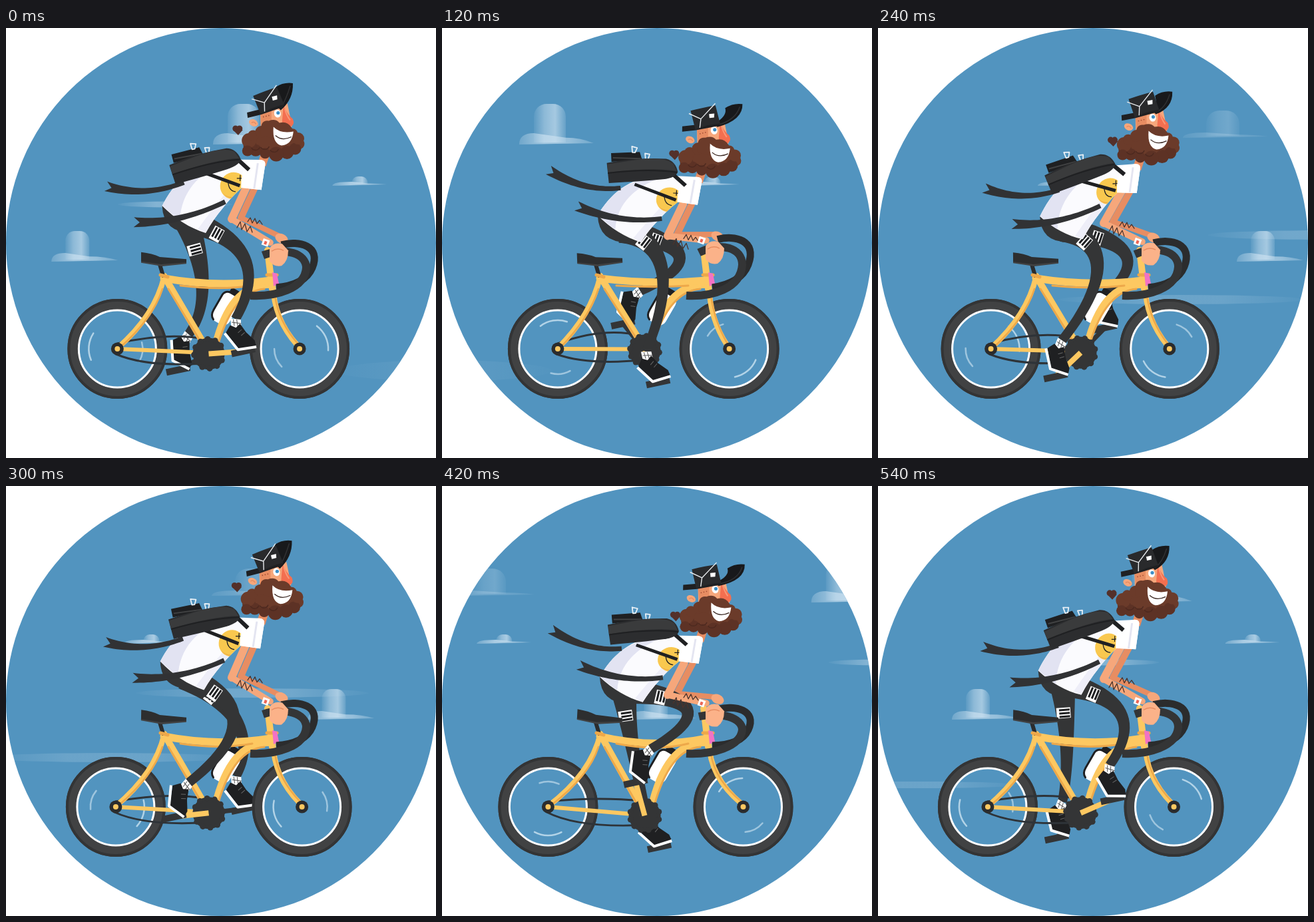
These frames come from a looping animation (646x646 px, 570 ms). An HTML page with a canvas:

```html
<!DOCTYPE html>
<html lang="en">
<head>
<meta charset="utf-8">
<title>Cyclist</title>
<style>
html, body { margin: 0; width: 100%; height: 100%; overflow: hidden; background: #fff; }
canvas { display: block; width: 646px; height: 646px; }
</style>
</head>
<body>
<canvas id="stage" width="646" height="646"></canvas>
<script>
const ctx = document.getElementById('stage').getContext('2d');
const STEP = 30, STEPS = 19, RAD = Math.PI / 180;
const SKY = '#5294bf', DARK = '#343536', BLACK = '#1f2022', GREY = '#414243';
const YELLOW = '#fdc861', AMBER = '#eda84a', SKIN = '#f6a77b', SHADE = '#e78d62';
const BROWN = '#6b3b2a', UMBER = '#5d3225';

const wave = (deg, mean, amp, peak) => mean + amp * Math.cos((deg - peak) * RAD);
const add = (p, x, y) => [p[0] + x, p[1] + y];
const mix = (p, q, u = .5) => [p[0] + (q[0] - p[0]) * u, p[1] + (q[1] - p[1]) * u];
const polar = (p, r, deg) => add(p, r * Math.cos(deg * RAD), r * Math.sin(deg * RAD));

function fill(d, color) {
  ctx.fillStyle = color;
  ctx.fill(new Path2D(d));
}
function line(d, color, w) {
  ctx.strokeStyle = color;
  ctx.lineWidth = w;
  ctx.stroke(new Path2D(d));
}
function dot(x, y, r, color, ry = r, tilt = 0) {
  ctx.fillStyle = color;
  ctx.beginPath();
  ctx.ellipse(x, y, r, ry, tilt * RAD, 0, 7);
  ctx.fill();
}
function arc(x, y, r, from, to, color, w) {
  ctx.strokeStyle = color;
  ctx.lineWidth = w;
  ctx.beginPath();
  ctx.arc(x, y, r, from * RAD, to * RAD);
  ctx.stroke();
}
function group(p, deg, draw) {
  ctx.save();
  ctx.translate(p[0], p[1]);
  ctx.rotate(deg * RAD);
  draw();
  ctx.restore();
}

// Quadratic curve through `m` at its middle.
function bend(a, m, b) {
  const c = [0, 1].map(i => 2 * m[i] - (a[i] + b[i]) / 2);
  return u => {
    const p = mix(a, c, u), q = mix(c, b, u);
    return [...mix(p, q, u), Math.atan2(q[1] - p[1], q[0] - p[0])];
  };
}
function taper(curve, width, color, notch = 0) {
  const left = [], right = [];
  for (let i = 0; i <= 24; i++) {
    const [x, y, t] = curve(i / 24), h = width(i / 24) / 2;
    left.push([x - h * Math.sin(t), y + h * Math.cos(t)]);
    right.unshift([x + h * Math.sin(t), y - h * Math.cos(t)]);
  }
  const [x, y, t] = curve(1);
  if (notch) left.push([x - notch * Math.cos(t), y - notch * Math.sin(t)]);
  fill('M' + [...left, ...right].join('L') + 'Z', color);
}

// Things that blow past leftwards: at `x` on step `k0`, repeating every loop.
function passes(k, k0, x, speed, draw) {
  const dk = (k - k0 + 1.5 * STEPS) % STEPS - STEPS / 2;
  for (const lap of [-STEPS, 0, STEPS]) draw(x - speed * (dk + lap));
}
function fade(x0, x1, ...stops) {
  const g = ctx.createLinearGradient(x0, 0, x1, 0);
  stops.forEach((a, i) => g.addColorStop(i / (stops.length - 1), `rgba(205,226,241,${a})`));
  return g;
}
function cloud(x, y, tw, th, l, r, bh, a) {
  ctx.fillStyle = fade(x - tw, x + tw, .1 * a, .6 * a, .85 * a, .2 * a);
  ctx.beginPath();
  ctx.roundRect(x - tw, y - th, 2 * tw, th - 3, [tw * .8, tw * .8, 0, 0]);
  ctx.fill();
  const base = `M${x - l},${y}Q${x - l},${y - bh} ${x - tw},${y - bh}L${x + tw},${y - bh * .6}Q${x + r * .7},${y - bh * .6} ${x + r},${y - 2}Z`;
  fill(base, fade(x - l, x + r, .3 * a, .85 * a, .7 * a, .3 * a));
}
function streak(x, y, w, h, a) {
  dot(x, y, w / 2, fade(x - w / 2, x + w / 2, .1 * a, a, a, .1 * a), h / 2);
}
function sky(k) {
  passes(k, 0, 357, 48.75, x => cloud(x, 175, 24, 61, 46, 66, 17, .8));
  passes(k, 8, 518, 74.5, x => cloud(x, 165, 25, 41, 60, 68, 8, .3));
  passes(k, 13, 364, 42.8, x => cloud(x, 351, 18, 46, 39, 61, 13, .8));
  passes(k, 8, 281, 31.3, x => cloud(x, 237, 12, 14, 41, 41, 6, .85));
  passes(k, 0, 254, 82.5, x => streak(x, 265, 172, 9, .4));
  passes(k, 8, 455, 150, x => streak(x, 408, 370, 14, .2));
  passes(k, 12, 70, 150, x => streak(x, 311, 350, 14, .25));
  passes(k, 16, 520, 230, x => streak(x, 449, 300, 10, .2));
  passes(k, 2, 330, 200, x => streak(x, 515, 470, 36, .1));
}

function wheel(x, turn) {
  const y = 482;
  arc(x, y, 67, 0, 360, GREY, 16);
  arc(x, y, 73, 0, 360, '#333435', 4);
  arc(x, y, 58, 0, 360, '#fff', 3);
  ctx.lineCap = 'round';
  arc(x, y, 43, turn - 28, turn + 28, 'rgba(220,238,248,.7)', 2.5);
  arc(x, y, 38, turn + 160, turn + 205, 'rgba(220,238,248,.55)', 2.5);
}
function hub(x) {
  dot(x, 482, 9.5, '#2b2c2d');
  dot(x, 482, 4, YELLOW);
}

// One leg with its crank, at its own phase of the pedal stroke.
function stroke(deg, bb, knee, reach) {
  const crank = deg - 4 - 6 * (1 - Math.cos(deg * RAD));
  const pedal = polar(bb, 52, crank);
  const foot = add(pedal, -8, wave(deg, -9, 9, 45));
  const tilt = wave(deg, 12, -32, 50);
  return {
    bb, pedal, foot, tilt, crank,
    knee: [wave(deg, knee[0], reach[0], 295), wave(deg, knee[1], reach[1], 107)]
  };
}
function crankArm({ bb, pedal }, color, w) {
  line(`M${bb}L${pedal}`, color, w);
  group(pedal, -12, () => fill('M-18,-5H18V5H-18Z', DARK));
}
function leg(hip, { knee, foot, tilt }) {
  const curve = bend(hip, knee, polar(foot, 46, tilt - 86));
  taper(curve, u => 14 + 20 * (1 - u) ** 3 + 5 * (1 - u), DARK);
  const [x, y, t] = curve(.2);
  group([x, y], t / RAD, () => {
    fill('M-8,-8H8V13H-8Z', '#fff');
    for (const dx of [-5, 0, 5]) fill(`M${dx - 1},-7h3V9h-3Z`, BLACK);
  });
  group(foot, tilt, () => {
    fill('M-4,-48L11,-44L10,-30L-5,-33Z', '#fff');
    line('M-3,-42L11,-38M0,-46V-36M5,-45V-34', '#555', 1);
    fill('M-14,-28L-6,-38L2,-33L9,-38L16,-24L27,-10L28,-1H1Z', BLACK);
    line('M-16,-27L0,0H28', '#fff', 4);
    line('M10,-29L4,-25M14,-24L8,-20', '#666', 1);
  });
}

function bike(rx, fx, bb, dy, crank, turn) {
  const sag = dy * .5;
  wheel(rx, turn);
  wheel(fx, turn + 150);
  group([330, 422], 30, () => {
    ctx.beginPath();
    ctx.roundRect(-15, -25, 30, 49, 10);
    ctx.fillStyle = '#fff';
    ctx.fill();
    line('M-8,23Q-15,20 -15,10V-16Q-14,-24 -6,-25H8', BLACK, 3);
    fill('M-8,-33H8V-25H-8Z', BLACK);
    line('M9,-18V16', '#d6dbe6', 3);
  });
  line(`M${rx},474Q${(rx + bb[0]) / 2 + 5},${456 + dy} ${bb[0] - 5},${bb[1] - 22}M${rx - 2},490Q${rx + 45},${510 + dy * .4} ${bb[0]},${bb[1] + 14}`, '#2e3338', 3);
  line(`M${rx},482L${bb[0] - 15},${bb[1] - 2}`, YELLOW, 6);
  line(`M238,372Q224,432 ${rx},481`, YELLOW, 8);
  line(`M235,392Q221,436 ${rx + 4},480`, AMBER, 2.5);
  line(`M401,385Q402,437 ${fx - 3},477`, YELLOW, 8);
  line(`M404,402Q409,440 ${fx - 3},474`, AMBER, 2.5);
  line(`M394,386Q336,385 ${bb[0] + 9},${bb[1] - 10}`, YELLOW, 10);
  line(`M388,392Q342,396 ${bb[0] + 14},${bb[1] - 14}`, AMBER, 3);
  line(`M240,377L${bb[0] - 3},${bb[1] - 8}`, YELLOW, 10);
  line(`M244,392L${bb[0] - 9},${bb[1] - 13}`, AMBER, 3);
  line(`M237,376Q318,${390 + sag} 398,379`, YELLOW, 11);
  line(`M262,387Q322,${394 + sag} 370,387`, AMBER, 3);
  line('M230,352L236,372', '#2b2c2d', 6);
  line('M232,371L243,374', AMBER, 5);
  group([237, 347], dy * .3, () => {
    fill('M-34,-10Q-17,-8 -6,-3L34,0V6L-4,9L-34,5Z', '#2d2e2f');
    fill('M-34,4L-4,8L34,5V7L-2,11L-34,6Z', GREY);
  });
  line('M393,334L400,392', YELLOW, 10);
  line('M392,371H407', AMBER, 5);
  fill('M400,367L407,369L410,384L402,388Z', '#f272c4');
  hub(rx);
  hub(fx);
  dot(...bb, 24, DARK);
  for (let i = 0; i < 12; i++) dot(...polar(bb, 22, i * 30 + crank), 4.5, DARK);
}
function bars(dy) {
  line(`M414,${325 + dy}C440,${318 + dy} 474,${326 + dy} 460,${360 + dy * .6}Q449,${386 + dy * .3} 406,390`, '#2b2c2d', 11);
  line(`M386,${341 + dy * .5}C420,${328 + dy} 451,${338 + dy} 451,${360 + dy * .6}C449,392 405,404 367,402`, DARK, 12);
}

// Draws torso artwork from its rest pose onto the moving hem and neck.
function onTorso(back, front, neck, draw) {
  const [mx, my] = [0, 1].map(i => {
    const u = front[i] - back[i], v = neck[i] - back[i];
    const x = (65 * u + 40 * v) / 10260, y = (146 * u - 68 * v) / 10260;
    return [x, y, back[i] - x * 234 - y * 268];
  });
  ctx.save();
  ctx.transform(mx[0], my[0], mx[1], my[1], mx[2], my[2]);
  draw();
  ctx.restore();
}
function shirt() {
  const outline = 'M234,268C250,235 275,203 330,198L380,198Q390,198 388,208L384,243L354,240Q338,255 327,270Q312,288 302,308C278,301 255,288 234,268Z';
  fill(outline, '#fbfbfe');
  ctx.save();
  ctx.clip(new Path2D(outline));
  fill('M234,268C250,235 275,205 320,205C290,220 262,245 262,290Z', '#e2e3f2');
  fill('M302,308Q325,270 350,240L338,238Q312,270 290,302Z', '#eeeef8');
  dot(341, 237, 20, '#f9c84f');
  fill('M325,248A20,20 0 0 0 352,252Q336,258 325,248Z', AMBER);
  ctx.restore();
  line('M351,221V230M346,226H355M333,231Q334,245 345,246', BLACK, 1.3);
  fill('M353,240Q351,218 362,200L380,198Q390,198 388,208L384,243Z', '#fff');
  line('M377,203L373,241', '#e4e5f1', 3);
  line('M287,215L351,237', BLACK, 5);
  line('M336,189L364,213', BLACK, 6);
}
function bag() {
  fill('M-47,-25L-4,-28L0,-16L-46,-12Z', BLACK);
  line('M-44,-18H-2', GREY, 2);
  line('M-15,-27L-16,-36L-8,-34L-11,-27ZM5,-18L4,-26L11,-25L9,-18', '#e8f0f6', 1.8);
  fill('M-53,-10Q-10,-20 36,-19Q50,-16 54,0Q52,9 32,12Q0,16 -49,20Z', '#2c2d2f');
  fill('M-20,-14Q30,-24 47,-12L52,-1Q20,-6 -51,4L-52,-8Z', '#3a3b3c');
  line('M-51,5Q10,-4 53,1', BLACK, 2);
}
function ribbon(from, tail, drop) {
  taper(bend(from, add(mix(from, tail), 0, drop), tail), u => 7 + 8 * u * u, '#313234', 9);
}

function head() {
  fill('M-21,-44L20,-52L27,-18L12,-4L-20,-8Z', SKIN);
  fill('M-21,-44L-4,-46L-4,-26L-19,-16Z', SHADE);
  dot(-31, -23, 7, SKIN, 5, 25);
  line('M-34,-23Q-30,-26 -27,-21', SHADE, 1.5);
  for (const x of [-16, -12, -8]) dot(x, -31 + x % 5, .9, '#a34e35');
  dot(5, -37, 5, '#fff', 6, -15);
  dot(6, -38, 2.6, '#3d8fc6');
  line('M-2,-44Q4,-48 11,-45', '#3b241d', 2);
  fill('M14,-49Q20,-35 28,-29Q32,-20 24,-17Q13,-17 12,-25Z', '#f36f50');
  line('M16,-45Q18,-35 24,-27', '#fa9775', 2);
  dot(0, 6, 39, BROWN, 19);
  for (let i = 0; i < 14; i++) {
    const [x, y] = polar([0, 0], 1, i * 360 / 14 + 8);
    dot(38 * x, 18 * y + 6, 8 + i * 5 % 4, y > .2 ? UMBER : BROWN);
  }
  dot(-40, 19, 8, UMBER);
  fill('M-20,-12Q-20,-28 -8,-26Q2,-30 8,-23Q20,-26 26,-16Q32,-10 26,-4L-4,0L-20,-4Z', BROWN);
  for (const x of [-28, -14, 0]) arc(x, 14 + x % 5, 7, 20, 150, '#4d291f', 1.5);
  fill('M-1,-17Q10,-6 29,-10Q27,10 11,11Q-3,8 -1,-17Z', '#fff');
  line('M2,-4Q12,5 26,-2', '#3a2721', 1.3);
}
function tuft() {
  for (const x of [-3, 3]) dot(x, -2, 4.5, '#54302a');
  fill('M-7,0L1,8L8,0Z', '#54302a');
}
function cap(tip, tilt) {
  const [x, y] = tip;
  fill(`M13,9Q${x - 22},${y + 18} ${x - 26},${y + 6}Q${x - 14},${y - 2} ${x},${y}Q${x + 1},${y + 24} 18,14Z`, '#18191b');
  line(`M18,11Q${x - 10},${y + 24} ${x - 4},${y + 4}`, '#303133', 1.5);
  group([0, 0], tilt, () => {
    fill('M-36,9L-18,9L21,8L20,14L-16,17L-37,17Z', BLACK);
    fill('M-21,-13Q0,-16 17,-17L21,11Q2,10 -17,16Z', '#292a2c');
    line('M-24,-9L-7,1L17,-20M-7,1L-10,14', '#e6e9ec', 1.4);
    fill('M6,-5L14,-5L13,1L6,1Z', '#fff');
  });
}
function arm(shoulder, elbow, hand, color, w) {
  line(`M${shoulder}L${elbow}`, color, w);
  line(`M${elbow}L${hand}`, color, w * .8);
}

function draw(k) {
  // The wheels and pedals cycle once per loop, the body bobs twice.
  const turn = 360 * k / STEPS;
  const bob = (mean, amp, peak) => wave(2 * turn, mean, amp, peak);

  const dy = wave(turn, 1.5, -9, 85);
  const bb = [304.5, 489 + dy * .6];
  const near = stroke(turn, bb, [348, 350], [23, 15]);
  const far = stroke(turn + 168, bb, [325, 370], [50, 38]);

  const back = [bob(236.5, 9.5, 258), bob(278, 17, 230)];
  const front = [bob(301.5, 8.5, 260), bob(317, 11, 215)];
  const neck = [bob(383, 5, 250), bob(216.5, 13.5, 180)];
  const tail = [bob(157, 10, 225), bob(227, 14, 320)];
  const bagAt = [neck[0] - 82, bob(213, 12, 235)];
  const headAt = add(neck, 21.5, -37.5);
  const brim = [bob(47, 11, 190), bob(-22, 7, 230)];
  const hip = add(mix(back, front), 4, 2);
  const elbow = [339, neck[1] + 84];
  const lift = dy * .4;

  ctx.clearRect(0, 0, 646, 646);
  ctx.save();
  ctx.lineJoin = 'round';
  ctx.lineCap = 'butt';
  dot(323, 323, 323, SKY);
  ctx.clip();
  sky(k);

  crankArm(far, DARK, 7);
  leg(hip, far);
  bike(wave(turn, 166.7, 7.3, 85), wave(turn, 442, -10.5, 85), bb, dy, near.crank, turn + 185);

  ctx.lineCap = 'round';
  arm(add(neck, -7, 36), [353, elbow[1] - 2], [412, 313 + lift], SHADE, 10);
  dot(414, 316 + lift, 10, SKIN, 7, 25);

  fill(`M${back}Q${add(back, 2, 44)} ${add(mix(back, front), 20, 20)}L${front}Z`, DARK);
  ctx.lineCap = 'butt';
  crankArm(near, YELLOW, 8);
  leg(hip, near);

  line(`M${add(neck, 3, 3)}L${add(neck, 9, -16)}`, SHADE, 13);
  ctx.lineCap = 'round';
  arm(add(neck, -20, 36), elbow, [397, 322 + lift], SKIN, 12);
  group(elbow, 0, () => {
    line('M8,13l5,-9 2,12 5,-9 3,12 5,-8 3,9M24,4l4,-6 3,8 4,-7 3,8 4,-5 4,6', '#4a332c', 1.3);
  });

  ctx.lineCap = 'butt';
  onTorso(back, front, neck, shirt);
  ribbon(add(bagAt, -32, 26), tail, 10);
  ribbon(add(neck, -52, 58), add(tail, 42, 54), 9);
  group(bagAt, bob(-6, 9, 120), bag);

  bars(dy);
  group([390, 322 + lift], 20, () => {
    fill('M-5,-5H5V5H-5Z', '#fff');
    fill('M-2,-2H2V3H-2Z', '#ec6656');
  });
  group([0, lift], 0, () => {
    fill('M396,331Q401,321 415,324L424,334Q424,350 414,357Q402,359 396,350Z', '#fbb289');
    line('M399,335Q408,329 417,334', SHADE, 1.5);
  });

  group(headAt, 0, head);
  group(add(headAt, -55, bob(-4, 12, 225)), 0, tuft);
  group(add(headAt, -8, -56), 0, () => cap(brim, bob(-9.5, 5, 200)));
  ctx.restore();
}

const start = performance.now();
function tick() {
  draw(Math.floor((performance.now() - start) / STEP) % STEPS);
  requestAnimationFrame(tick);
}
tick();
</script>
</body>
</html>
```
